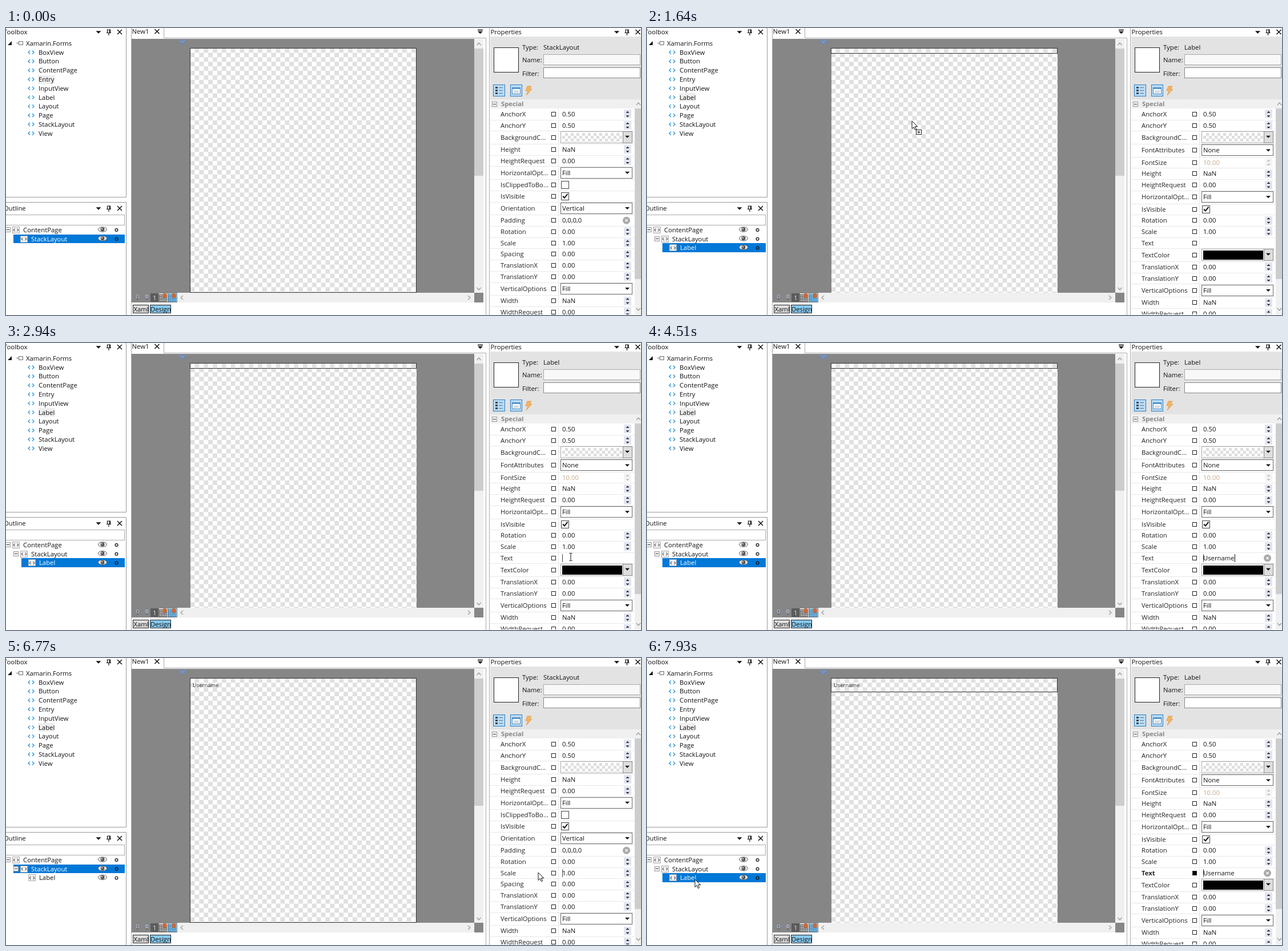
These frames come from a looping animation (1112 by 503 pixels, 8 s). An HTML page:

```html
<!DOCTYPE html>
<html lang="en">
<head>
<meta charset="utf-8">
<title>Visual designer</title>
<style>
  html, body { margin: 0; width: 100%; height: 100%; overflow: hidden; background: #fff; }
  svg { display: block; width: 100vw; height: 100vh; }
  text { font: 11.3px "Open Sans", "Noto Sans", sans-serif; white-space: pre; }
  rect { shape-rendering: crispEdges; }
</style>
</head>
<body>
<svg id="stage" viewBox="0 0 1112 503" xmlns="http://www.w3.org/2000/svg"></svg>
<script>
const LOOP = 8000;
const stage = document.getElementById('stage');

// Markup helpers
const box = (x, y, w, h, fill, stroke) =>
  `<rect x="${x}" y="${y}" width="${w}" height="${h}" fill="${fill}"${stroke ? ` stroke="${stroke}"` : ''}/>`;
const frame = (x, y, w, h, fill, stroke) => box(x + .5, y + .5, w - 1, h - 1, fill, stroke);
const label = (x, cy, s, fill = '#111', attrs = '') =>
  `<text x="${x}" y="${cy + 4}" fill="${fill}" ${attrs}>${s}</text>`;
const line = (d, stroke = '#111', width = 1) =>
  `<path d="${d}" fill="none" stroke="${stroke}" stroke-width="${width}"/>`;
const shape = (d, fill = '#111', attrs = '') => `<path d="${d}" fill="${fill}" ${attrs}/>`;
const group = (id, content) => `<g id="${id}">${content}</g>`;
const down = (x, y, r = 4, fill) => shape(`M${x - r} ${y - r / 2}h${2 * r}l${-r} ${r}z`, fill);
const up = (x, y, r = 4, fill) => shape(`M${x - r} ${y + r / 2}h${2 * r}l${-r} ${-r}z`, fill);
const cross = (x, y, r = 4, color = '#111', w = 1.5) =>
  line(`M${x - r} ${y - r}l${2 * r} ${2 * r}m0 ${-2 * r}l${-2 * r} ${2 * r}`, color, w);
const brackets = (x, y, color, r = 3, w = 1.6) =>
  line(`M${x - 2} ${y - r}l${-r} ${r}l${r} ${r}M${x + 2} ${y - r}l${r} ${r}l${-r} ${r}`, color, w);
const pin = (x, y) =>
  line(`M${x - 2.5} ${y + 1}v-5h5v5M${x + 1.5} ${y - 4}v5M${x - 4} ${y + 1.5}h8M${x} ${y + 1}v5`, '#111', 1.2);
const titleIcons = (x, y) => down(x, y + .5, 4.5) + pin(x + 18, y) + cross(x + 37, y);
const minus = (x, y) =>
  frame(x - 4, y - 4, 9, 9, '#f4f4f4', '#999') + line(`M${x - 2} ${y + .5}h5`, '#333');
const chevron = (x, y, dx, dy) => line(
  dx ? `M${x - dx} ${y - 3.5}l${2 * dx} 3.5l${-2 * dx} 3.5` : `M${x - 3.5} ${y - dy}l3.5 ${2 * dy}l3.5 ${-2 * dy}`,
  '#999', 1.2);

const defs = `<defs>
  <pattern id="check" x="322.5" y="35.5" width="15.8" height="15.8" patternUnits="userSpaceOnUse">
    <path d="M0 0h15.8v15.8H0z" fill="#fff"/><path d="M7.9 0h7.9v7.9H7.9zM0 7.9h7.9v7.9H0z" fill="#e0e0e0"/>
  </pattern>
  <pattern id="swatch" x="974" y="184" width="10" height="10" patternUnits="userSpaceOnUse">
    <path d="M0 0h10v10H0z" fill="#fff"/><path d="M5 0h5v5H5zM0 5h5v5H0z" fill="#dedede"/>
  </pattern></defs>`;

function toolbox() {
  const items = ['BoxView', 'Button', 'ContentPage', 'Entry', 'InputView', 'Label',
    'Layout', 'Page', 'StackLayout', 'View'];
  let out = line('M0 296.5H210.5V0', '#999') + label(-4, 7, 'Toolbox') + titleIcons(162, 7)
    + shape('M10 23v7h-7z') + line('M18 26.5h4', '#777')
    + frame(22, 23, 8, 7, '#eee', '#777') + label(35, 26.5, 'Xamarin.Forms')
    + '<rect id="hover" x="56" width="29" height="15" fill="#eeeeee"/>';
  items.forEach((name, i) => {
    const y = 42.6 + i * 15.78;
    out += brackets(44, y, '#4aa3dc') + label(57, y, name);
  });
  return out;
}

function treeRow(depth, y, name, selected, expander) {
  const x = 17 + depth * 14;
  const eye = `<ellipse cx="169" cy="${y - 1}" rx="7.5" ry="4.2" fill="#eee" stroke="#666"/>
    <circle cx="169" cy="${y - 1}" r="3.4" fill="#555"/><circle cx="168" cy="${y - 2}" r="1" fill="#fff"/>`;
  return (selected ? box(x - 18.5, y - 8, 209.5 - x + 17, 15.5, '#0078d7') : '')
    + (expander ? minus(x - 14, y - 1) : '')
    + frame(x - 6, y - 6, 13, 12, '#f1f1f1', '#aaa') + brackets(x + .5, y, '#555', 2.4, 1.1)
    + label(x + 13, y, name, selected ? '#fff' : '#111') + eye
    + `<circle cx="193.5" cy="${y}" r="2.4" fill="none" stroke="#111" stroke-width="1.2"/>`;
}

function outline() {
  const page = treeRow(0, 354, 'ContentPage', false, true);
  const tree = (hasChild, childSelected) => page
    + treeRow(1, 369.7, 'StackLayout', !childSelected, hasChild)
    + (hasChild ? treeRow(2, 385.4, 'Label', childSelected, false) : '');
  return line('M0 305.5H210.5V503', '#999') + label(-4, 316, 'Outline') + titleIcons(162, 316)
    + frame(-2, 327, 210, 19, '#fff', '#aaa')
    + group('treeEmpty', tree(false, false)) + group('treeParent', tree(true, false))
    + group('treeChild', tree(true, true));
}

function designer() {
  const zoom = (x, sign) => `<circle cx="${x}" cy="470" r="4" fill="#a9adb5" stroke="#6f7681"/>`
    + line(`M${x - 2} 470h4${sign ? `m-2-2v4` : ''}`, '#4f5a70') + line(`M${x} 474v3`, '#666', 1.5);
  const grid = (x, color) => {
    let d = '';
    for (let i = 0; i < 5; i++) d += `M${x + 1 + i * 3} 467v13M${x} ${467.5 + i * 3}h14`;
    return line(d, color) + `<circle cx="${x + 10}" cy="469" r="4" fill="#c66a3c"/>`;
  };
  return line('M219.5 503V0M276.5 0V17.5H840.5V503', '#aaa')
    + label(220.5, 6, 'New1') + cross(264.5, 6)
    + line('M826 3.5h9', '#111', 1.6) + down(830.5, 8, 4.5)
    + box(220, 19, 616, 461.5, '#868686')
    + box(303, 19.5, 12, 8.5, '#7288ac') + line('M305 21.5l4 4l4-4', '#a3b5d2')
    + box(322.5, 35.5, 396, 428.5, 'url(#check)')
    + '<g clip-path="inset(0)"><rect id="selection" x="322.5" y="35.5" width="396" fill="none" stroke="#333" stroke-width="1.3"/></g>'
    + label(327, 47, 'Username', '#222', 'id="pageText" style="font-size:9.4px"')
    + box(220, 464, 80, 16.5, '#868686') + box(820, 464, 16, 16.5, '#868686')
    + box(820, 19, 16, 445, '#f0f0f0') + box(820, 36, 16, 223, '#cdcdcd')
    + box(300, 464, 520, 16.5, '#f0f0f0')
    + chevron(828, 28, 0, -2) + chevron(828, 457, 0, 2) + chevron(308, 472.5, -2) + chevron(811, 472.5, 2)
    + zoom(230.5, true) + zoom(246.5, false)
    + box(253, 465, 14, 15, '#5c5c5c') + label(257, 473, '1', '#ddd')
    + box(268, 465, 15, 15, '#ddd') + grid(268, '#555')
    + box(284, 465, 15, 15, '#8fcdf0') + grid(284, '#3f82b5')
    + box(220, 480.5, 616, 23, '#fff')
    + frame(222, 485, 28, 15, '#dddddd', '#222') + label(223.5, 492.5, 'Xaml')
    + frame(252, 485, 37, 15, '#87c9ef', '#222') + label(253, 492.5, 'Design');
}

// Property editors, each centred on y
const spinner = (y, faint) => {
  const ink = faint ? '#bbb' : '#222';
  return box(1082, y - 7.5, 13, 15, faint ? '#f4f4f7' : '#e2e5f0')
    + up(1088.5, y - 3.5, 3, ink) + down(1088.5, y + 4, 3, ink);
};
const clearButton = y => `<circle cx="1086.5" cy="${y}" r="6.5" fill="#aaa"/>` + cross(1086.5, y, 2, '#fff', 1.2);
const editors = {
  num: (y, v) => label(974, y, v) + spinner(y),
  dim: (y, v) => label(974, y, v, '#c5a98a') + spinner(y, true),
  combo: (y, v) => frame(971, Math.round(y) - 10, 126, 20, '#fff', '#666') + label(974, y, v) + down(1088, y, 4),
  color: (y, v) => frame(971, Math.round(y) - 11, 126, 21, '#fff', '#aaa')
    + box(974, Math.round(y) - 8, 104.5, 16, v)
    + frame(1080, Math.round(y) - 11, 17, 21, '#dedede', '#888') + down(1088, y - 1, 4),
  check: (y, v) => frame(972, Math.round(y) - 7, 14, 14, '#fff', '#444')
    + (v ? line(`M975 ${y}l3 3l5.5-7`, '#111', 2) : ''),
  text: (y, v) => v ? label(974, y, v) + clearButton(y) : ''
};
const heights = { color: 22.6, combo: 22.8 };

function rows(list) {
  let top = 141, out = '';
  for (const [name, kind, value] of list) {
    const h = heights[kind] || 19.7, y = top + h / 2;
    const id = name === 'Text' ? 'id="textName"' : '';
    const mark = name === 'Text' ? 'id="textMark"' : '';
    out += label(866, y, name, '#222', id)
      + `<rect ${mark} x="955.5" y="${Math.round(y) - 3.5}" width="7" height="7" fill="#fff" stroke="#222"/>`
      + editors[kind](y, value)
      + line(`M848 ${Math.round(top + h) + .5}H1100`, '#e8e8e8');
    top += h;
  }
  return out;
}

function properties() {
  const anchors = [['AnchorX', 'num', '0.50'], ['AnchorY', 'num', '0.50'],
    ['BackgroundC...', 'color', 'url(#swatch)']];
  const size = [['Height', 'num', 'NaN'], ['HeightRequest', 'num', '0.00']];
  const fill = ['HorizontalOpt...', 'combo', 'Fill'];
  const visible = ['IsVisible', 'check', true];
  const turn = [['Rotation', 'num', '0.00'], ['Scale', 'num', '1.00']];
  const tail = [['TranslationX', 'num', '0.00'], ['TranslationY', 'num', '0.00'],
    ['VerticalOptions', 'combo', 'Fill'], ['Width', 'num', 'NaN'], ['WidthRequest', 'num', '0.00']];
  const layoutRows = [...anchors, ...size, fill, ['IsClippedToBo...', 'check', false], visible,
    ['Orientation', 'combo', 'Vertical'], ['Padding', 'text', '0,0,0,0'], ...turn,
    ['Spacing', 'num', '0.00'], ...tail];
  const labelRows = [...anchors, ['FontAttributes', 'combo', 'None'], ['FontSize', 'dim', '10.00'],
    ...size, fill, visible, ...turn, ['Text', 'text', ''], ['TextColor', 'color', '#000'], ...tail];
  return line('M846.5 0V503', '#aaa') + label(848.5, 7, 'Properties') + titleIcons(1069.5, 7)
    + box(848, 15, 264, 110, '#e3e3e3')
    + frame(854, 34, 44, 44, '#fff', '#222')
    + label(904, 33.5, 'Type:') + label(904, 56, 'Name:') + label(904, 79.5, 'Filter:')
    + frame(941, 46, 170, 19, '#f8f8f8', '#aaa') + frame(941, 69, 170, 19, '#fff', '#888')
    + frame(853, 99, 21, 21, '#b9dcf5', '#2d7dc1') + frame(883, 99, 21, 21, '#b9dcf5', '#2d7dc1')
    + line('M857 104.5h4m-4 5h4m-4 5h4', '#345', 3) + line('M863 104.5h7m-7 5h7m-7 5h7', '#56738f', 1.2)
    + frame(886, 104, 15, 12, '#fff', '#4a89be') + box(887, 105, 13, 2, '#5b9bd0')
    + line('M889 110.5h9m-9 2.5h9', '#9ab')
    + shape('M913 102h7l-3 5h4l-10 11l3-8h-4z', '#f3b55e', 'stroke="#d99a55" stroke-width=".8"')
    + box(848, 125, 253, 16, '#f0f0f0') + minus(855, 133)
    + label(867, 133, 'Special', '#888', 'font-weight="700" style="font-weight:700"')
    + box(1101, 125, 11, 377, '#f0f0f0') + box(1101, 141, 11, 299, '#cdcdcd')
    + chevron(1107.5, 133, 0, -2) + chevron(1107.5, 493, 0, 2)
    + line('M967.5 141V502', '#e8e8e8')
    + group('layoutPanel', label(941, 33.5, 'StackLayout') + rows(layoutRows))
    + group('labelPanel', label(941, 33.5, 'Label') + rows(labelRows)
      + label(974, 377, '', '#111', 'id="typed"') + group('clear', clearButton(377)))
    + box(847, 502, 265, 1, '#fff')
    + group('caretStart', line('M974.5 370V384', '#444')) + group('caretEnd', line('M.5 370V384', '#111'));
}

const pointer = group('pointer',
  group('arrow', shape('M0 0v13.5l3.2-3l2.3 5.2l2.2-1l-2.3-5h4.3z', '#fff', 'stroke="#111" stroke-width="1"')
    + group('copy', frame(7, 15, 10, 9, '#fff', '#222') + line('M9.5 19.5h5m-2.5-2.5v5', '#111')))
  + group('beam', line('M-2.5-6.5h2l.5.5l.5-.5h2M0-6V6M-2.5 6.5h2l.5-.5l.5.5h2', '#111')));

stage.innerHTML = defs + box(0, 0, 1112, 503, '#fff')
  + toolbox() + outline() + designer() + properties() + pointer;

const el = {};
stage.querySelectorAll('[id]').forEach(node => { el[node.id] = node; });
const show = (id, on) => el[id].setAttribute('display', on ? 'inline' : 'none');

// Pointer moves: first step, last step, step count, start, bend, end
const moves = [
  [130, 910, 11, [800, 300], [420, 150], [60, 92]],
  [1000, 1150, 3, [60, 92], [60, 108], [60, 121]],
  [1330, 1640, 5, [60, 121], [260, 125], [464, 163]],
  [2020, 2700, 10, [464, 163], [800, 500], [989, 375]],
  [5520, 6070, 8, [989, 375], [800, 345], [639, 331]],
  [6370, 6770, 6, [639, 331], [800, 350], [932, 376]],
  [6850, 6930, 2, [932, 376], [935, 376], [937, 375]],
  [7090, 7630, 8, [937, 375], [480, 12], [76, 388]],
  [7790, 7790, 1, [76, 388], [80, 388], [84, 388]]
];
const keyTimes = [3720, 3800, 3950, 4030, 4190, 4360, 4430, 4510];
const smooth = u => u * u * (3 - 2 * u);

function pointerAt(t) {
  const move = moves.filter(m => t >= m[0]).pop();
  if (!move) return null;
  const [start, end, count, a, b, c] = move;
  const gap = (end - start) / Math.max(1, count - 1);
  const step = gap ? Math.floor((t - start) / gap + 1e-6) + 1 : count;
  const u = smooth(Math.min(1, step / count));
  return [0, 1].map(i => (1 - u) ** 2 * a[i] + 2 * u * (1 - u) * b[i] + u * u * c[i]);
}

function draw(t) {
  const hasLabel = t >= 1560;
  const committed = t >= 6140;
  const reselected = t >= 7790;
  const labelSelected = hasLabel && (!committed || reselected);

  show('treeEmpty', !hasLabel);
  show('treeParent', hasLabel && !labelSelected);
  show('treeChild', labelSelected);
  show('layoutPanel', !labelSelected);
  show('labelPanel', labelSelected);
  show('pageText', committed);
  el.hover.setAttribute('y', t < 1330 ? 82.5 : 114);
  el.selection.setAttribute('height', !labelSelected ? 428.5 : reselected ? 24 : 9);

  const typed = 'Username'.slice(0, keyTimes.filter(k => t >= k).length);
  el.typed.textContent = typed;
  show('clear', typed);
  show('caretStart', t >= 2870);
  show('caretEnd', typed && t < 6070);
  if (typed && t < 6070) {
    const x = 974 + Math.round(el.typed.getComputedTextLength());
    el.caretEnd.setAttribute('transform', `translate(${x})`);
  }
  el.textName.style.fontWeight = reselected ? 700 : 400;
  el.textMark.setAttribute('fill', reselected ? '#000' : '#fff');

  const spot = pointerAt(t);
  const typing = t >= 3720 && t < 5520;
  show('pointer', spot && !typing);
  if (!spot) return;
  const overText = spot[0] > 972;
  show('beam', overText);
  show('arrow', !overText);
  show('copy', t >= 1330 && t < 1860);
  el.pointer.setAttribute('transform', `translate(${spot.map(Math.round)})`);
}

const began = performance.now();
function tick() {
  draw((performance.now() - began) % LOOP);
  requestAnimationFrame(tick);
}
tick();
</script>
</body>
</html>
```
